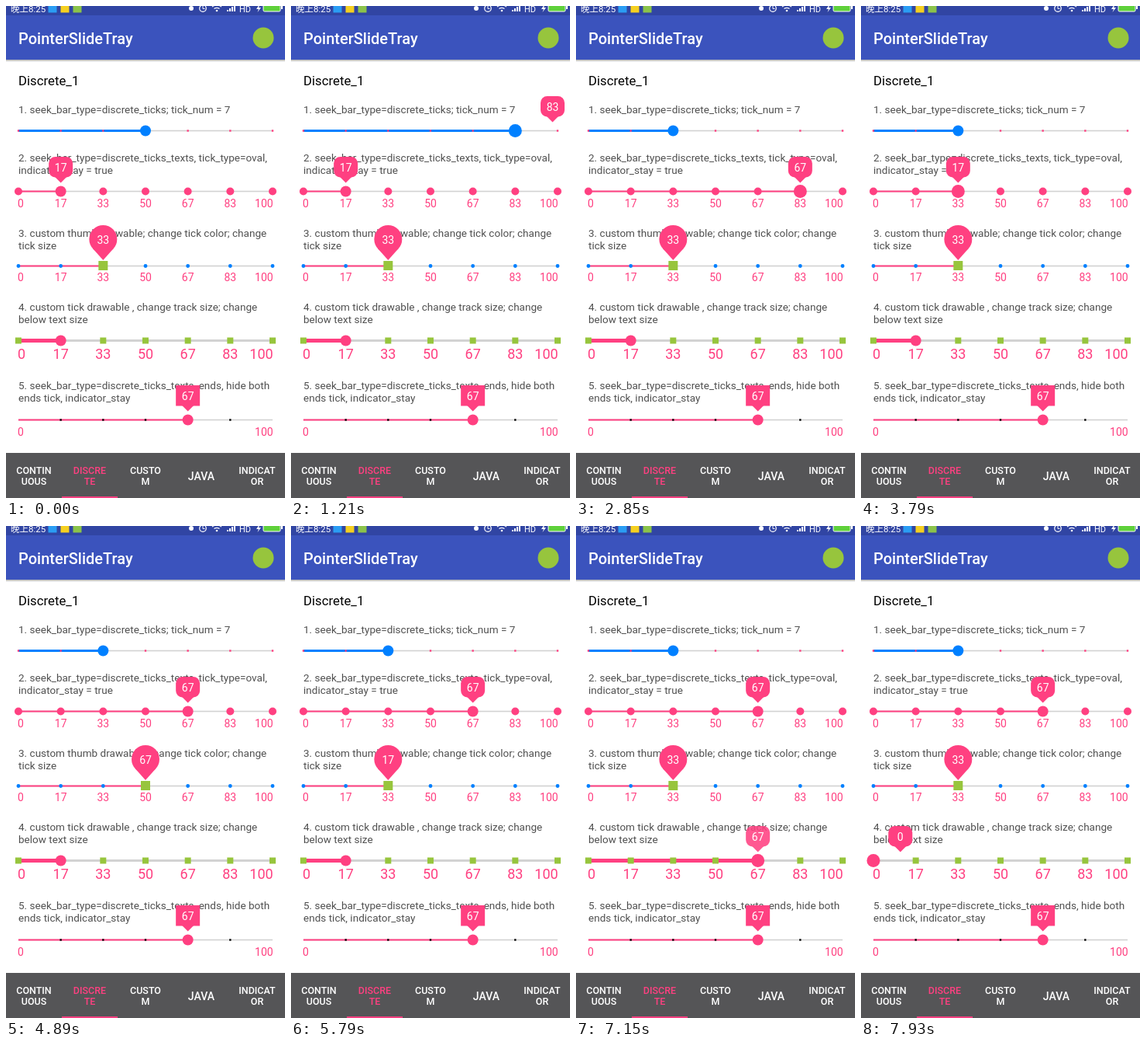
An HTML page for the animation above (8000 ms loop, 360x633 px).

```html
<!DOCTYPE html>
<html lang="en">
<head>
<meta charset="utf-8">
<title>Discrete sliders</title>
<style>
  html, body { margin: 0; width: 100%; height: 100%; overflow: hidden; background: #fff; }
  svg { display: block; width: 100%; height: 100%; font-family: Roboto, "Noto Sans CJK SC", "Noto Sans CJK", sans-serif; }
  .mid { text-anchor: middle; }
</style>
</head>
<body>
<svg id="stage" viewBox="0 0 360 633"></svg>
<script>
const LOOP = 8000;
const REFRESH = 93;     // the finger is read at this interval
const BUBBLE_LAG = 50;
const VALUE_LAG = 90;
const PINK = '#ff4081', BLUE = '#0080ff', GREEN = '#97c53d', GREY = '#d2d2d2';
const VALUES = Array.from({ length: 7 }, (_, i) => Math.round(i * 100 / 6));
const stage = document.getElementById('stage');

const tickX = i => 16 + i * 328 / 6;
const clamp = (v, lo, hi) => Math.max(lo, Math.min(hi, v));
const within = (t, span) => !!span && t >= span[0] && t < span[1];

const rect = (x, y, w, h, fill, more = '') =>
  `<rect x="${x}" y="${y}" width="${w}" height="${h}" fill="${fill}" ${more}/>`;
const dot = (x, y, r, fill) => `<circle cx="${x}" cy="${y}" r="${r}" fill="${fill}"/>`;
const square = (x, y, size, fill) => rect(x - size / 2, y - size / 2, size, size, fill);
const label = (s, x, y, size, fill, more = '') =>
  `<text x="${x}" y="${y}" font-size="${size}" fill="${fill}" ${more}>${s}</text>`;

// path: key points [time, position in ticks] of the finger.
// follow: the bubble trails the finger; otherwise the printed value trails the thumb.
const sliders = [
  {
    y: 160.5, top: 138, color: BLUE, line: 3,
    tick: (x, y) => square(x, y, 2.4, PINK),
    text: ['1. seek_bar_type=discrete_ticks; tick_num = 7'],
    press: [300, 2080], show: [650, 2080], fade: 740, follow: true,
    path: [[700, 3], [740, 4], [950, 4], [965, 6], [1160, 6], [1660, 0], [1740, 0], [1940, 2]]
  },
  {
    y: 238.5, top: 200, color: PINK, line: 2, labels: [259, 14],
    tick: (x, y) => dot(x, y, 5, PINK),
    text: ['2. seek_bar_type=discrete_ticks_texts, tick_type=oval,', 'indicator_stay = true'],
    press: [2080, 4380], show: [0, LOOP],
    path: [[2130, 1], [2230, 2], [2615, 2], [2820, 5], [3200, 5], [3580, 1], [3730, 1], [4010, 4]]
  },
  {
    y: 334.5, top: 297, color: PINK, line: 2, labels: [354, 14],
    tick: (x, y) => dot(x, y, 2.4, BLUE),
    text: ['3. custom thumb drawable; change tick color; change', 'tick size'],
    shape: 'drop', show: [0, LOOP],
    path: [[4400, 2], [4560, 4], [4800, 4], [5160, 2], [5550, 2], [5630, 1], [5730, 1], [6180, 6],
      [6270, 6], [6580, 2]]
  },
  {
    y: 430.5, top: 392, color: PINK, line: 5, back: 3, labels: [454, 18],
    tick: (x, y) => square(x, y, 8, GREEN),
    text: ['4. custom tick drawable , change track size; change', 'below text size'],
    press: [6860, LOOP], show: [7150, LOOP], fade: 7250, follow: true,
    path: [[6850, 1], [6860, 4], [7380, 4], [7600, 2], [7780, 2], [7890, 0]]
  },
  {
    y: 532.5, top: 493, color: PINK, line: 2, labels: [553, 14], endsOnly: true,
    tick: (x, y, i) => i % 6 ? square(x, y, 2.4, '#000') : '',
    text: ['5. seek_bar_type=discrete_ticks_texts_ends, hide both', 'ends tick, indicator_stay'],
    shape: 'box', show: [0, LOOP],
    path: [[0, 4]]
  }
];

function fingerAt(path, t) {
  const next = path.findIndex(p => p[0] > t);
  if (next < 0) return path[path.length - 1][1];
  if (next === 0) return path[0][1];
  const [t0, a] = path[next - 1], [t1, b] = path[next];
  return a + (b - a) * (t - t0) / (t1 - t0);
}

function poseAt({ path, follow }, t) {
  const read = follow ? Math.floor(t / REFRESH) * REFRESH : t;
  const thumb = Math.round(fingerAt(path, read));
  return follow
    ? { thumb, value: thumb, bubble: fingerAt(path, read - BUBBLE_LAG) }
    : { thumb, value: Math.round(fingerAt(path, t - VALUE_LAG)), bubble: thumb };
}

function track(s, t) {
  const x = tickX(poseAt(s, t).thumb);
  const back = s.back || 1.6;
  const thumb = s.shape === 'drop'
    ? square(x, s.y - .5, 12, GREEN)
    : dot(x, s.y, within(t, s.press) ? 8.5 : 7, s.color);
  return rect(16, s.y - back / 2, 328, back, GREY)
    + rect(16, s.y - s.line / 2, x - 16, s.line, s.color)
    + VALUES.map((v, i) => s.tick(tickX(i), s.y, i)).join('') + thumb;
}

function bubble(s, t) {
  if (!within(t, s.show)) return '';
  const pose = poseAt(s, t);
  const drop = s.shape === 'drop';
  const x = clamp(tickX(pose.bubble), drop ? 18 : 23, drop ? 342 : 337.5);
  const y = s.y - .5;
  const body = drop
    ? dot(x, y - 34, 18, PINK)
      + `<path d="M${x - 13.4} ${y - 22}h26.8L${x} ${y - 7}z" fill="${PINK}"/>`
    : rect(x - 15.5, y - 44, 31, 26.5, PINK, s.shape === 'box' ? '' : 'rx="8.5"')
      + `<path d="M${x - 7.5} ${y - 18}h15l-7.5 7.5z" fill="${PINK}"/>`;
  return `<g opacity="${t < s.fade ? .87 : 1}">${body}`
    + label(VALUES[pose.value], x, y - (drop ? 28 : 25), 14, '#fff', 'class="mid"') + '</g>';
}

function sliderTexts(s) {
  let out = s.text.map((line, i) => label(line, 16, s.top + i * 16, 13.55, '#505050')).join('');
  if (s.labels) VALUES.forEach((v, i) => {
    if (s.endsOnly && i % 6) return;
    const anchor = i === 0 ? 'start' : i === 6 ? 'end' : 'middle';
    const nudge = i === 0 ? -1 : i === 6 ? .7 : 0;
    out += label(v, tickX(i) + nudge, ...s.labels, PINK, `text-anchor="${anchor}"`);
  });
  return out;
}

function statusBar() {
  const arc = r => `<path d="M${272 - r} ${7 - r}Q272 ${7 - r * 1.7} ${272 + r} ${7 - r}" fill="none" stroke="#fff" stroke-width="1.2"/>`;
  const bars = [0, 1, 2, 3].map(i => rect(285 + i * 3, 5 - i * 2, 2, 2 + i * 2, '#fff')).join('');
  return rect(0, 0, 360, 12, '#3145a3')
    + label('晚上8:25', 6, 7.5, 11.5, '#fff')
    + ['#2a9df4', '#f5d020', '#8bc34a'].map((c, i) => square(60 + i * 16, 3, 11, c)).join('')
    + dot(239, 3, 3, '#fff')
    + '<path d="M254 0v3.5h2.5" fill="none" stroke="#fff"/><circle cx="254" cy="3" r="4.3" fill="none" stroke="#fff" stroke-width="1.2"/>'
    + arc(6) + arc(3.5) + dot(272, 6, 1.3, '#fff') + bars
    + label('HD', 301, 7.5, 11, '#fff')
    + '<path d="M327-2l-4 6h3l-1.5 4 4.500-6h-3l2-4z" fill="#fff"/>'.replace('4.500', '4.5')
    + rect(332, -3, 22, 10, '#5fd13a', 'rx="1.5" stroke="#fff"') + rect(355, 0, 2, 4, '#fff');
}

function header() {
  return '<defs><linearGradient id="shade" x2="0" y2="1"><stop stop-color="#aaa"/><stop offset="1" stop-color="#fff"/></linearGradient></defs>'
    + rect(0, 12, 360, 57, '#3b53bd') + rect(0, 69, 360, 3, 'url(#shade)') + statusBar()
    + label('PointerSlideTray', 16, 49, 20, '#fff', 'font-weight="500"')
    + dot(332, 41, 13.5, GREEN)
    + label('Discrete_1', 16, 102, 16.8, '#000');
}

function tabs() {
  const names = ['CONTIN UOUS', 'DISCRE TE', 'CUSTO M', 'JAVA', 'INDICAT OR'];
  return rect(0, 575, 360, 58, '#555557') + rect(72, 631, 72, 2, PINK)
    + names.map((name, i) => name.split(' ').map((line, k, { length }) =>
      label(line, 36 + i * 72, length > 1 ? 602 + k * 14 : 609.5, length > 1 ? 12.5 : 14,
        i === 1 ? PINK : '#fff', 'class="mid" font-weight="500"')).join('')).join('');
}

stage.innerHTML = rect(0, 0, 360, 633, '#fff') + header() + sliders.map(sliderTexts).join('')
  + tabs() + '<g id="live"></g>';
const live = document.getElementById('live');
let shown = '';

function draw(t) {
  const markup = sliders.map(s => track(s, t)).join('') + sliders.map(s => bubble(s, t)).join('');
  if (markup !== shown) live.innerHTML = shown = markup;
}

const start = performance.now();
function frame() {
  draw((performance.now() - start) % LOOP);
  requestAnimationFrame(frame);
}
frame();
</script>
</body>
</html>
```
